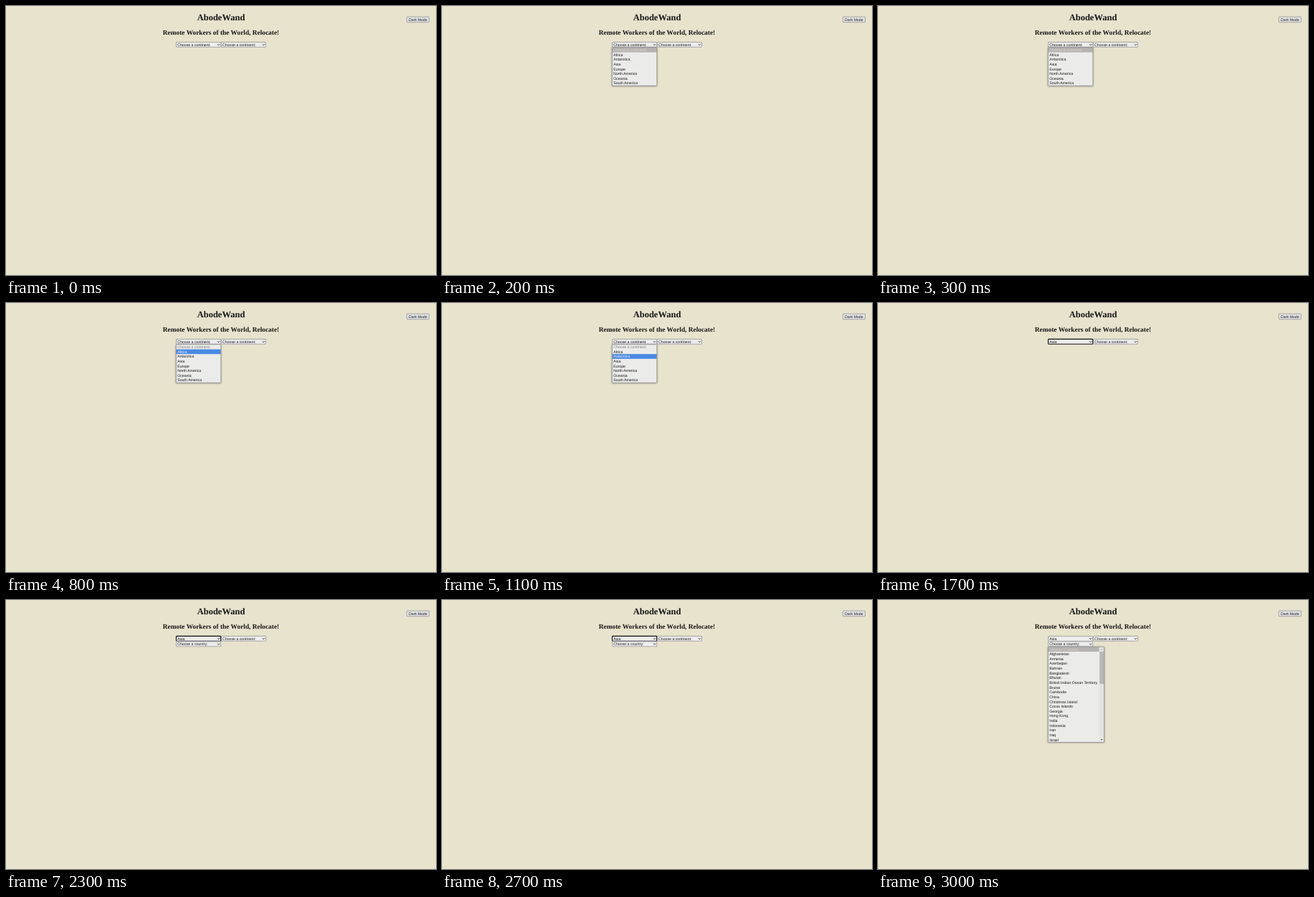
An HTML page with a canvas for the animation above (3100 ms loop, 600 by 375 pixels).

```html
<!DOCTYPE html>
<html lang="en">
<head>
<meta charset="utf-8">
<title>AbodeWand</title>
<style>
html, body { margin: 0; width: 100%; height: 100%; overflow: hidden; background: #e8e3cd; }
canvas { display: block; width: 600px; height: 375px; }
</style>
</head>
<body>
<canvas id="stage"></canvas>
<script>
const LOOP = 3100, ROW = 6.64, LEFT = 237.2, SELECT_W = 62.8;
const SANS = '"Liberation Sans", Arial, sans-serif';
const SERIF = '"Liberation Serif", "Times New Roman", serif';
const INK = '#151515';
const continents = ['Choose a continent:', 'Africa', 'Antarctica', 'Asia', 'Europe',
  'North America', 'Oceania', 'South America'];
const countries = ['Choose a country:', 'Afghanistan', 'Armenia', 'Azerbaijan', 'Bahrain',
  'Bangladesh', 'Bhutan', 'British Indian Ocean Territory', 'Brunei', 'Cambodia', 'China',
  'Christmas Island', 'Cocos Islands', 'Georgia', 'Hong Kong', 'India', 'Indonesia',
  'Iran', 'Iraq', 'Israel'];

const canvas = document.getElementById('stage');
const ctx = canvas.getContext('2d');
const ratio = window.devicePixelRatio || 1;
canvas.width = 600 * ratio;
canvas.height = 375 * ratio;
ctx.scale(ratio, ratio);
ctx.textRendering = 'geometricPrecision';

function text(str, x, y, color = INK, font = `5.21px ${SANS}`, align = 'left') {
  ctx.font = font;
  ctx.textAlign = align;
  ctx.fillStyle = color;
  ctx.fillText(str, x, y);
}

function rect(x, y, w, h, color) {
  ctx.fillStyle = color;
  ctx.fillRect(x, y, w, h);
}

function outline(x, y, w, h, color, width) {
  ctx.strokeStyle = color;
  ctx.lineWidth = width;
  ctx.beginPath();
  ctx.roundRect(x, y, w, h, 0.6);
  ctx.stroke();
}

function triangle(x, y, dir, color) {
  ctx.fillStyle = color;
  ctx.beginPath();
  ctx.moveTo(x - 1.4, y - 0.7 * dir);
  ctx.lineTo(x + 1.4, y - 0.7 * dir);
  ctx.lineTo(x, y + 0.8 * dir);
  ctx.fill();
}

function select(x, y, label, focused) {
  rect(x, y, SELECT_W, 7.4, '#ededee');
  outline(x + 0.3, y + 0.3, SELECT_W - 0.6, 6.9, focused ? '#101010' : '#767676', focused ? 1.1 : 0.6);
  text(label, x + 2, y + 5.5);
  const cx = x + SELECT_W - 3.4, cy = y + 3.1;
  ctx.strokeStyle = INK;
  ctx.lineWidth = 0.85;
  ctx.beginPath();
  ctx.moveTo(cx - 1.6, cy);
  ctx.lineTo(cx, cy + 1.6);
  ctx.lineTo(cx + 1.6, cy);
  ctx.stroke();
}

function menu(y, w, items, active, bar = 0) {
  const h = items.length * ROW + 0.8;
  ctx.save();
  ctx.shadowColor = 'rgba(0,0,0,.4)';
  ctx.shadowBlur = 2.5 * ratio;
  ctx.shadowOffsetY = 0.8 * ratio;
  rect(LEFT, y, w, h, '#ebebea');
  ctx.restore();
  items.forEach((item, i) => {
    const top = y + 0.4 + i * ROW, on = i === active;
    if (on) rect(LEFT + 0.4, top, w - bar - 0.8, ROW, i ? '#4a89e4' : '#b5b3b0');
    const color = i ? (on ? '#f4f7fd' : INK) : (on ? '#dad7d0' : '#808080');
    text(item, LEFT + 2, top + 5.1, color);
  });
  if (bar) {
    const x = LEFT + w - bar - 0.3;
    rect(x, y + 0.4, bar, h - 0.8, '#e4e4e3');
    rect(x + 0.4, y + 7, bar - 0.8, 45, '#b8b8b7');
    triangle(x + bar / 2, y + 3.8, -1, '#999');
    triangle(x + bar / 2, y + h - 3.8, 1, '#404040');
  }
  outline(LEFT + 0.2, y + 0.2, w - 0.4, h - 0.4, '#6d6d6d', 0.6);
}

function draw(t) {
  rect(0, 0, 600, 375, '#e8e3cd');
  text('AbodeWand', 300, 20.1, INK, `bold 12.5px ${SERIF}`, 'center');
  text('Remote Workers of the World, Relocate!', 300, 40.2, INK, `bold 9.375px ${SERIF}`, 'center');

  rect(559, 14.8, 31.7, 8.2, '#e3e4e6');
  outline(559.3, 15.1, 31.1, 7.6, '#767676', 0.6);
  text('Dark Mode', 574.8, 20.8, INK, undefined, 'center');

  const chosen = t >= 1700;
  select(LEFT + SELECT_W, 50.1, continents[0], false);
  select(LEFT, 50.1, continents[chosen ? 3 : 0], chosen && t < 3000);
  if (t >= 2300) select(LEFT, 57.6, countries[0], false);

  if (t >= 200 && !chosen) {
    const active = t < 600 ? 0 : t < 1100 ? 1 : t < 1200 ? 2 : 3;
    menu(57.5, SELECT_W, continents, active);
  }
  if (t >= 3000) menu(65, 78.5, countries, 0, 6.6);
}

const start = performance.now();
function tick() {
  draw((performance.now() - start) % LOOP);
  requestAnimationFrame(tick);
}
tick();
</script>
</body>
</html>
```
